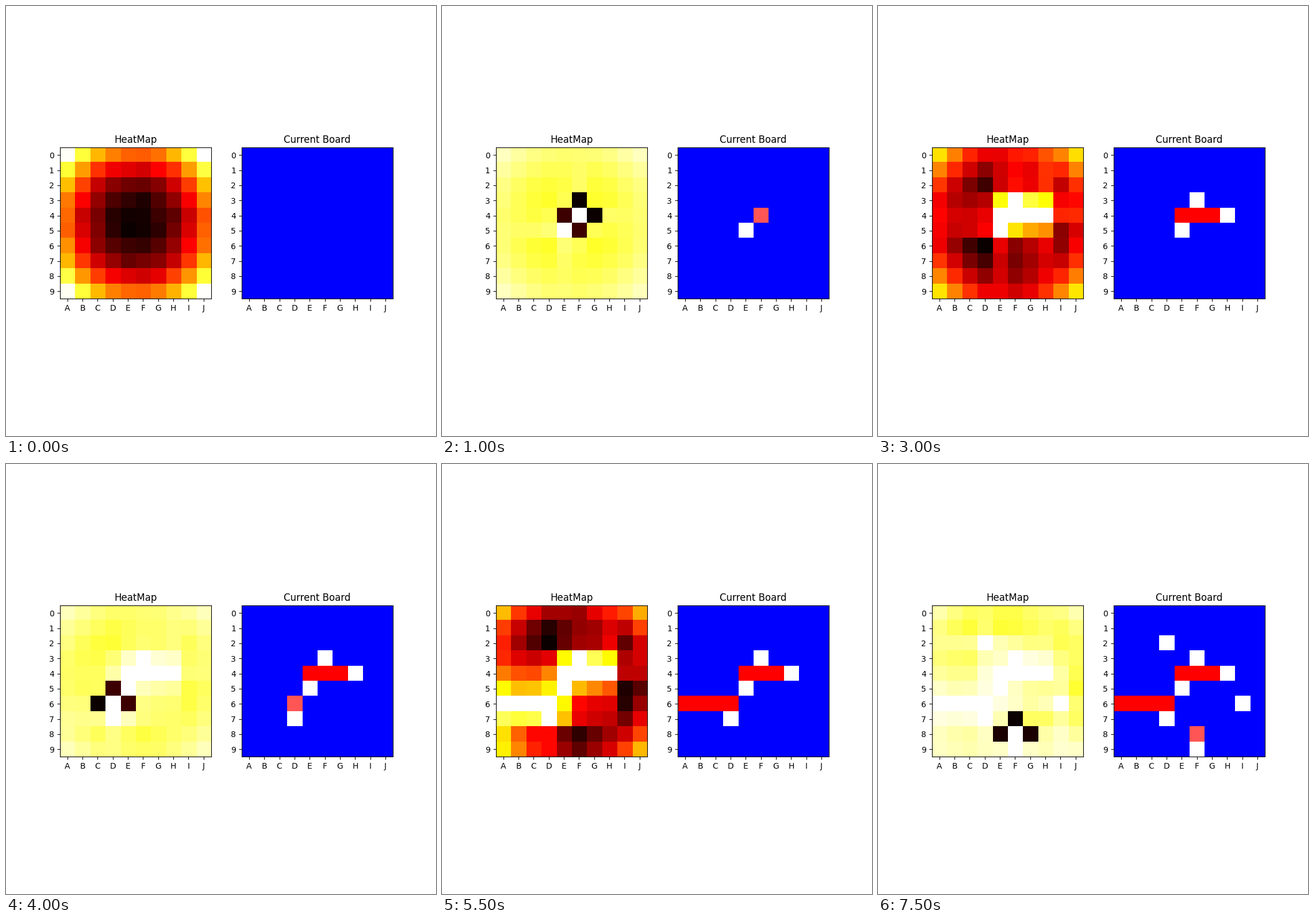
A matplotlib script for the animation above (8 s loop, 748x748 px).

```python
import numpy as np
import matplotlib.pyplot as plt
from matplotlib.animation import FuncAnimation

SIZE = 10
COLS = "ABCDEFGHIJ"
FLEET = [5, 4, 3, 3, 2]
SHOTS = "E5 F4 F3 G4 H4 E4 D6 D7 C6 B6 A6 D2 I6 F8 F9 F7".split()
SHIPS = [("E4", "F4", "G4"), ("A6", "B6", "C6", "D6"), ("F8", "F7")]
SAMPLES = 40000
HIT_BONUS = 1.0

WATER, MISS = (0, 0, 255), (255, 255, 255)
HIT, SUNK = (255, 85, 85), (255, 0, 0)


def cell(name):
    return int(name[1]), COLS.index(name[0])


def coverage(length, free):
    """Chance that a random legal placement of one ship covers each cell."""
    count = np.zeros((SIZE, SIZE))
    for grid, total in ((free, count), (free.T, count.T)):
        for r in range(SIZE):
            for c in range(SIZE - length + 1):
                if grid[r, c:c + length].all():
                    total[r, c:c + length] += 1
    return count / max(count.sum() / length, 1)


def candidates(hits, free):
    """Free neighbours of the open hits, along their line once it is known."""
    steps = [(0, 1), (0, -1), (1, 0), (-1, 0)]
    if len(hits) > 1:
        steps = steps[:2] if hits[0][0] == hits[1][0] else steps[2:]
    found = {(r + dr, c + dc) for r, c in hits for dr, dc in steps}
    return [(r, c) for r, c in found
            if 0 <= r < SIZE and 0 <= c < SIZE and free[r, c]]


def state(turn):
    """Heat map and board colours after the given number of shots."""
    fired = SHOTS[:turn]
    board = np.full((SIZE, SIZE, 3), WATER, dtype=np.uint8)
    free = np.ones((SIZE, SIZE), dtype=bool)
    for name in fired:
        free[cell(name)] = False
        board[cell(name)] = MISS

    fleet, open_hits = FLEET.copy(), []
    for ship in SHIPS:
        struck = [cell(n) for n in ship if n in fired]
        sunk = len(struck) == len(ship)
        for pos in struck:
            board[pos] = SUNK if sunk else HIT
        if sunk:
            fleet.remove(len(ship))
        else:
            open_hits += struck

    rng = np.random.default_rng(turn)
    chance = sum(coverage(n, free) for n in fleet)
    heat = rng.binomial(SAMPLES, chance) / SAMPLES
    for pos in candidates(open_hits, free):
        heat[pos] = chance[pos] + HIT_BONUS
    heat[cell(SHOTS[turn])] = heat.max()
    return heat, board


def panel(ax, title, data, **style):
    ax.set_title(title)
    ax.set_xticks(range(SIZE), list(COLS))
    ax.set_yticks(range(SIZE))
    return ax.imshow(data, **style)


turns = [state(t) for t in range(len(SHOTS))]

# 7.5 in at this dpi is 748 px
fig, (left, right) = plt.subplots(1, 2, figsize=(7.5, 7.5), dpi=99.734)
heat_img = panel(left, "HeatMap", turns[0][0], cmap="hot_r")
board_img = panel(right, "Current Board", turns[0][1])


def update(turn):
    heat, board = turns[turn]
    heat_img.set_data(heat)
    heat_img.set_clim(heat.min(), heat.max())
    board_img.set_data(board)
    return heat_img, board_img


anim = FuncAnimation(fig, update, frames=len(SHOTS), interval=500,
                     repeat=True, repeat_delay=0)
plt.show()
```
